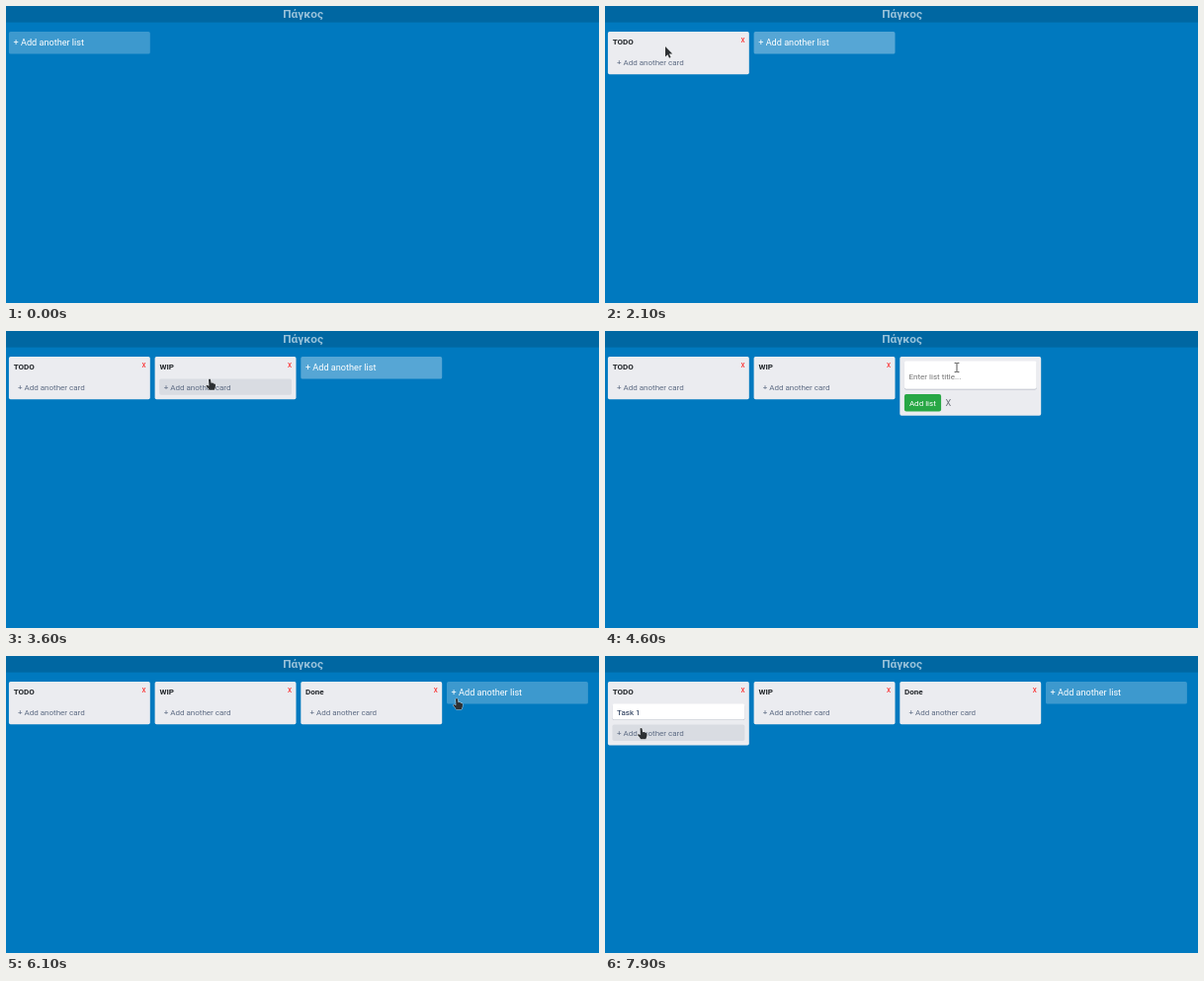
Recreate the animation shown at these times as an HTML page with a canvas. Size 600 by 301 pixels, loop 8000 ms.

```html
<!DOCTYPE html>
<html lang="en">
<head>
<meta charset="utf-8">
<title>Task board</title>
<style>
  html, body { margin: 0; height: 100%; overflow: hidden; background: #0079bf; }
  canvas { display: block; }
</style>
</head>
<body>
<canvas width="600" height="301"></canvas>
<script>
const ctx = document.querySelector('canvas').getContext('2d');
const LOOP = 8000, STEP = 100;
const PITCH = 147.7, LIST_W = 142.9, INNER_W = 133.8;
const SMALL = 8, NORMAL = 9.14;
const INK = '#172b4d', MUTED = '#5e6c84', PANEL = '#ebecf0';

// Each form opens, receives its letters at the given times, then submits.
const listForms = [
  { text: 'TODO', open: 700, keys: [1100, 1500, 1600, 1700], submit: 2000 },
  { text: 'WIP', open: 2600, keys: [3100, 3200, 3300], submit: 3500 },
  { text: 'Done', open: 4100, keys: [4800, 5100, 5200, 5300], submit: 5500 },
];
const cardForm = { text: 'Task 1', open: 6900, keys: [7100, 7200, 7300, 7400, 7500, 7600], submit: 7800 };

// Pointer path: time, x, y
const path = [
  [300, 311, 4], [700, 61, 41], [2300, 61, 41], [2600, 216, 35], [2700, 216, 35],
  [2900, 206, 48.6], [3600, 206, 48.6], [4100, 356, 37], [5500, 356, 37], [6000, 456, 43],
  [6100, 456, 43], [6500, 230, 80], [6800, 37, 58], [6900, 37, 58], [7100, 36.5, 73],
];

let pointer, pointerKind;

function pointerAt(t) {
  if (t < path[0][0]) return null;
  const next = path.findIndex(p => p[0] > t);
  if (next < 0) return path.at(-1).slice(1);
  const [t0, x0, y0] = path[next - 1], [t1, x1, y1] = path[next];
  const u = (t - t0) / (t1 - t0), e = u * u * (3 - 2 * u);
  return [x0 + (x1 - x0) * e, y0 + (y1 - y0) * e];
}

function hover(x, y, w, h, kind) {
  const inside = pointer && pointer[0] >= x && pointer[0] <= x + w && pointer[1] >= y && pointer[1] <= y + h;
  if (inside) pointerKind = kind;
  return inside;
}

function box(x, y, w, h, color, radius = 1.7) {
  ctx.fillStyle = color;
  ctx.beginPath();
  ctx.roundRect(x, y, w, h, radius);
  ctx.fill();
}

function label(text, x, y, color, size = SMALL, weight = 400) {
  ctx.font = `${weight} ${size}px Roboto, sans-serif`;
  ctx.fillStyle = color;
  ctx.fillText(text, x, y);
}

function whiteBox(x, y, h) {
  box(x, y + 0.6, INNER_W, h, 'rgba(9,30,66,.25)');
  box(x, y, INNER_W, h, '#fff');
}

function drawForm(form, t, x, y, placeholder, action) {
  const typed = form.keys.filter(k => k <= t);
  const text = form.text.slice(0, typed.length);
  whiteBox(x, y, 28.4);
  hover(x, y, INNER_W, 28.4, 'beam');
  label(text || placeholder, x + 4.6, y + 18.6, text ? INK : '#757575');
  const lastInput = typed.at(-1) ?? form.open;
  if ((t - lastInput) % 1000 < 500) {
    const caretX = x + 4.6 + ctx.measureText(text).width;
    ctx.fillRect(caretX, y + 11, 0.7, 9.4);
  }
  const buttonW = action === 'Add list' ? 37.2 : 40;
  box(x, y + 33.5, buttonW, 17.6, '#28a745', 2);
  label(action, x + 5, y + 45.1, '#fff');
  label('X', x + buttonW + 4.4, y + 45.3, '#6b7078', NORMAL);
}

function drawList(form, t, x, hasCards) {
  const editing = hasCards && t >= cardForm.open && t < cardForm.submit;
  const hasCard = hasCards && t >= cardForm.submit;
  const inner = x + 4.6;
  box(x, 26, LIST_W, editing ? 78 : hasCard ? 64.4 : 43.2, PANEL);
  label(form.text, inner + 0.2, 38.9, '#212529', SMALL, 700);
  label('X', x + 134.5, 36.8, '#f00', 6.4);
  if (editing) {
    drawForm(cardForm, t, inner, 48.4, 'Enter a title for this card...', 'Add card');
    return;
  }
  if (hasCard) {
    whiteBox(inner, 48.4, 16);
    label(cardForm.text, inner + 4.6, 60.1, INK);
  }
  const y = hasCard ? 69.6 : 48.4;
  if (hover(inner, y, INNER_W, 16.4, 'hand')) box(inner, y, INNER_W, 16.4, 'rgba(9,30,66,.08)');
  label('+ Add another card', inner + 4.5, y + 11.7, MUTED);
}

function drawAdder(t, x, closedAt) {
  const glow = Math.max(0, 1 - (t - closedAt) / 115);
  box(x, 26, LIST_W, 22.6, `rgba(255,255,255,${0.24 + 0.76 * glow})`);
  hover(x, 26, LIST_W, 22.6, 'hand');
  label('+ Add another list', x + 4.6, 40.2, '#fff', NORMAL);
}

const handShape = new Path2D(
  'M-1 .6Q0-.6 1 .6L1.6 4.2 3 4Q4 4 4.2 4.8L5.3 4.9Q6 5.2 6 6L5.8 8.6 4.8 11.2-.4 11.2-1.6 9.2-3.4 7.3Q-3.6 6-2.2 6.3L-.6 7.2Z');
const arrowShape = new Path2D('M0 0V10.4L2.4 8.2 4 11.8 5.6 11.1 4 7.6H7.3Z');

function drawPointer() {
  if (!pointer) return;
  ctx.save();
  ctx.translate(...pointer);
  if (pointerKind === 'beam') {
    ctx.strokeStyle = '#444';
    ctx.lineWidth = 0.9;
    ctx.stroke(new Path2D('M-2.4-4.6H-.6L0-4 .6-4.6H2.4M0-4V4M-2.4 4.6H-.6L0 4 .6 4.6H2.4'));
  } else {
    const shape = pointerKind === 'hand' ? handShape : arrowShape;
    ctx.strokeStyle = 'rgba(255,255,255,.7)';
    ctx.lineWidth = 1;
    ctx.stroke(shape);
    ctx.fillStyle = '#2d3033';
    ctx.fill(shape);
  }
  ctx.restore();
}

function draw(t) {
  pointer = pointerAt(t);
  pointerKind = 'arrow';
  ctx.fillStyle = '#0079bf';
  ctx.fillRect(0, 0, 600, 301);
  ctx.fillStyle = '#0067a2';
  ctx.fillRect(0, 0, 600, 16.6);
  ctx.textAlign = 'center';
  label('Πάγκος', 300.6, 12, 'rgba(255,255,255,.6)', 11.8, 700);
  ctx.textAlign = 'left';

  const columnX = i => 2.9 + i * PITCH;
  const done = listForms.filter(f => t >= f.submit).length;
  for (let i = 0; i < done; i++) drawList(listForms[i], t, columnX(i), i === 0);

  const x = columnX(done), form = listForms[done];
  if (form && t >= form.open) {
    box(x, 26, LIST_W, 59.8, PANEL);
    drawForm(form, t, x + 4.6, 30.4, 'Enter list title...', 'Add list');
  } else {
    drawAdder(t, x, done ? listForms[done - 1].submit : -LOOP);
  }
  drawPointer();
}

const start = performance.now();
function frame() {
  const t = (performance.now() - start) % LOOP;
  draw(Math.floor(t / STEP) * STEP);
  requestAnimationFrame(frame);
}
frame();
</script>
</body>
</html>
```
